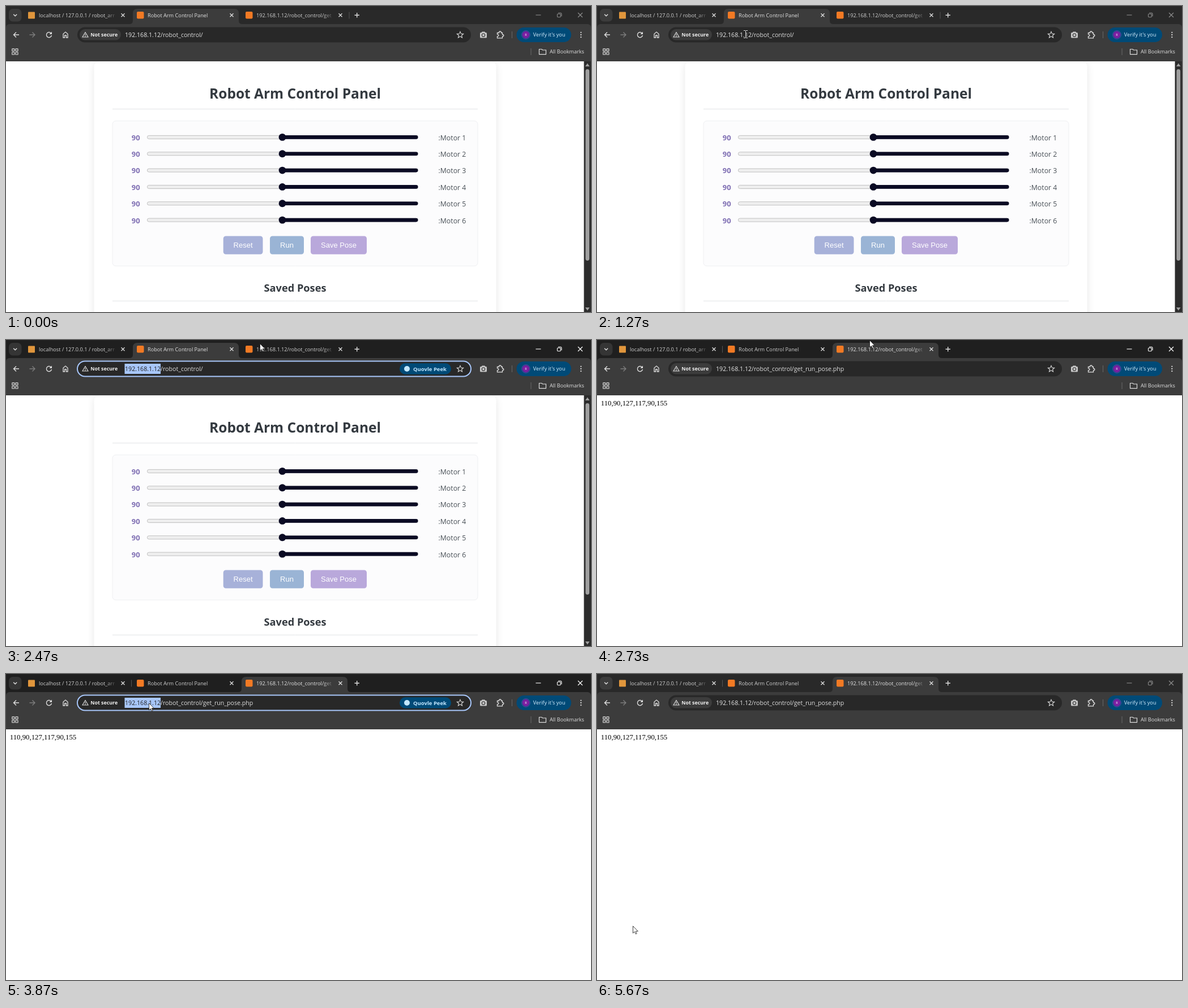
Write an HTML page with a canvas that moves like this. It is 1033 by 542 pixels and loops after 5.74 s.

```html
<!DOCTYPE html>
<html lang="en">
<head>
<meta charset="utf-8">
<title>Robot Arm Control Panel</title>
<style>
html, body { margin: 0; width: 100%; height: 100%; overflow: hidden; background: #fff; }
canvas { display: block; width: 1033px; height: 542px; }
</style>
</head>
<body>
<canvas id="stage"></canvas>
<script>
const W = 1033, H = 542, LOOP = 5740, STEP = 200 / 3;
const canvas = document.getElementById('stage');
const ctx = canvas.getContext('2d');
const dpr = window.devicePixelRatio || 1;
canvas.width = W * dpr;
canvas.height = H * dpr;

const SANS = '"Open Sans", "Noto Sans", sans-serif';
const ARIAL = '"Liberation Sans", Arial, sans-serif';
const SERIF = '"Liberation Serif", "Times New Roman", serif';
const HOST = '192.168.1.12';
const BAR = '#3c3c3c', ICON = '#dedede', BLUE = '#a8c7fa', NAVY = '#004a77';

// Pointer keys: time, x, y; equal neighbours hold the pose.
const PATH = [
  [70, 1020, 522], [270, 800, 300], [470, 530, 70], [600, 452, 12],
  [670, 440, 13], [730, 395, 32], [800, 332, 48], [1000, 285, 51],
  [1200, 263, 51], [1270, 262, 50], [2200, 262, 50], [2470, 448, 6],
  [2600, 462, 8], [2730, 481, 0], [2800, 470, 6], [3070, 240, 66],
  [3200, 216, 66], [3330, 271, 51], [3530, 253, 51], [3670, 253, 51],
  [3730, 252, 51], [4400, 252, 51], [4530, 190, 200], [4730, 25, 459],
  [5530, 25, 459], [5600, 32, 511], [5670, 63, 446], [LOOP, 63, 446]
];

function text(s, x, y, size, color, { weight = 400, family = SANS, align = 'left' } = {}) {
  ctx.font = `${weight} ${size}px ${family}`;
  ctx.textAlign = align;
  ctx.fillStyle = color;
  ctx.fillText(s, x, y);
}

function box(x, y, w, h, r, fill, stroke, width = 1) {
  ctx.beginPath();
  ctx.roundRect(x, y, w, h, r);
  paint(fill, stroke, width);
}

function circle(x, y, r, fill, stroke, width = 1) {
  ctx.beginPath();
  ctx.arc(x, y, r, 0, Math.PI * 2);
  paint(fill, stroke, width);
}

function paint(fill, stroke, width) {
  if (fill) { ctx.fillStyle = fill; ctx.fill(); }
  if (stroke) { ctx.strokeStyle = stroke; ctx.lineWidth = width; ctx.stroke(); }
}

// SVG path drawn relative to a point.
function shape(d, x, y, fill, stroke, width = 1.3) {
  const p = new Path2D(d);
  ctx.save();
  ctx.translate(x, y);
  if (fill) { ctx.fillStyle = fill; ctx.fill(p); }
  if (stroke) { ctx.strokeStyle = stroke; ctx.lineWidth = width; ctx.stroke(p); }
  ctx.restore();
}

const line = (d, x, y, color = ICON, width) => shape(d, x, y, null, color, width);
const cross = (x, y, r, color, width) =>
  line(`M${-r} ${-r}L${r} ${r}M${r} ${-r}L${-r} ${r}`, x, y, color, width);

function fadedText(s, x, y, right, color, under) {
  ctx.save();
  ctx.beginPath();
  ctx.rect(x - 1, 5, right - x + 1, 26);
  ctx.clip();
  text(s, x, y, 9.2, color);
  const g = ctx.createLinearGradient(right - 16, 0, right, 0);
  g.addColorStop(0, under + '00');
  g.addColorStop(1, under + 'c0');
  ctx.fillStyle = g;
  ctx.fillRect(right - 16, 9, 16, 16);
  ctx.restore();
}

function activeTab(x) {
  shape('M-6 27Q0 27 0 21V8Q0 0 8 0H179Q187 0 187 8V21Q187 27 193 27V28H-6Z', x, 5, BAR);
}

function tabStrip(s) {
  const strip = s.focused ? '#1f1f1f' : '#292929';
  ctx.fillStyle = strip;
  ctx.fillRect(0, 0, W, 40);
  box(5, 5, 22.5, 22.5, 7, s.focused ? '#353535' : BAR);
  line('M-3 -1.5L0 1.5L3 -1.5', 16.2, 16.3, ICON, 1.5);

  activeTab(s.second ? 416 : 224);
  if (s.hover > 0) {
    ctx.globalAlpha = s.hover;
    box(416, 5, 187, 23, 8, '#4a4a4a');
    ctx.globalAlpha = 1;
  }
  if (s.second) line('M0 0V12', 221.5, 10.5, '#555', 1);
  else if (!s.hover && !s.overTab) line('M0 0V12', 606, 10.5, '#555', 1);

  box(39, 10.5, 12, 12, 1, '#e0963c');
  box(231, 10, 12.5, 12.5, 2, '#f27a24');
  box(423, 10, 12.5, 12.5, 2, '#f27a24');
  const under = s.second ? BAR : s.hover > 0.5 ? '#4a4a4a' : strip;
  fadedText('localhost / 127.0.0.1 / robot_arm', 58, 20, 192, '#d0d0d0', strip);
  text('Robot Arm Control Panel', 250, 20, 9.2, s.second ? '#d0d0d0' : '#e3e3e3');
  fadedText(HOST + '/robot_control/get_', 442, 20, 575, s.second ? '#e3e3e3' : '#d0d0d0', under);
  for (const x of [206.5, 398.5, 590.5]) cross(x, 16.3, 3, ICON, 1.3);
  line('M-4.2 0H4.2M0 -4.2V4.2', 619.7, 16.3, ICON, 1.4);

  const ctl = s.focused ? '#fff' : '#8c8c8c';
  line('M-4.5 0H4.5', 940, 16, ctl, 1.1);
  box(973.5, 14, 5.8, 5.8, 1.2, null, ctl, 1.1);
  line('M-2 -4H2Q4 -4 4 -2V2', 977, 16.2, ctl, 1.1);
  cross(1014, 16, 4, ctl, 1.2);
}

function toolbar(s) {
  box(0, 32, W, 66, [6, 6, 0, 0], BAR);
  line('M5 0H-4M0 -4.5L-4.5 0L0 4.5', 18, 51, ICON, 1.4);
  line('M-5 0H4M0 -4.5L4.5 0L0 4.5', 46.5, 51, '#7d7d7d', 1.4);
  line('M3.2 -3.2A4.6 4.6 0 1 0 4.5 1', 76, 51, ICON, 1.4);
  shape('M5 -5.5V-1H.5Z', 76, 51, ICON);
  line('M-4 5V-1.5L0 -5L4 -1.5V5H1.4V1H-1.4V5Z', 105, 51, ICON, 1.3);

  if (s.selected) box(126, 37.5, 695, 27, 13.5, '#282828', BLUE, 2);
  else box(126, 37.5, 695, 27, 13.5, '#282828');
  if (!s.selected) box(130, 41, 73, 19.5, 9.75, BAR);
  line('M0 -4.5L5 4H-5ZM0 -1.5V1.4M0 2V3.2', 140, 51, ICON, 1.1);
  text('Not secure', 149.3, 54.3, 8.85, '#eee', { weight: 700 });

  const path = '/robot_control/' + (s.second ? 'get_run_pose.php' : '');
  text(HOST, 210, 54.7, 10.62, '#e8e8e8');
  const hostWidth = ctx.measureText(HOST).width;
  if (s.selected) {
    ctx.fillStyle = BLUE;
    ctx.fillRect(209.5, 42, hostWidth + 0.5, 18);
    text(HOST, 210, 54.7, 10.62, '#1f1f1f');
    box(695, 41.3, 91, 19.4, 9.7, NAVY);
    circle(708, 51, 5, '#c2e7ff');
    text('Quovle Peek', 719, 54.5, 9.5, '#c2e7ff', { weight: 700 });
  }
  text(path, 210 + hostWidth, 54.7, 10.62, '#dcdcdc');

  line('M0 -5.6L1.6 -1.9L5.6 -1.6L2.6 1L3.5 5L0 2.9L-3.5 5L-2.6 1L-5.6 -1.6L-1.6 -1.9Z', 802, 51, ICON, 1.1);
  box(837, 47, 12, 9.5, 1.5, '#c8c8c8');
  box(840, 45.4, 6, 3, 1, '#c8c8c8');
  circle(843, 51.6, 2.7, '#c8c8c8', '#444', 1.3);
  line('M-5 -3.5H-2Q-2 -6 0 -6T2 -3.5H4V-.5Q6.3 -.5 6.3 1.2T4 3V5.8H-5V2.8Q-2.6 2.8 -2.6 1T-5 -.8Z', 872.5, 51, ICON, 1.3);
  line('M0 -6V6', 893.5, 51, '#686868', 1);
  box(901.5, 38, 96.5, 26, 13, NAVY);
  circle(918, 51, 7.3, null, '#5a49a8', 1);
  circle(918, 51, 6.2, '#7b1fa2');
  text('R', 918, 53, 5.5, '#fff', { align: 'center' });
  text("Verify it's you", 930.8, 54.3, 9.2, '#d8efff');
  for (const y of [46.8, 51, 55.2]) circle(1015.3, y, 1.15, ICON);

  for (const x of [10.8, 17]) for (const y of [75.8, 82]) box(x, y, 4, 4, 0.3, null, ICON, 1.2);
  line('M0 -6V6', 927, 81, '#686868', 1);
  line('M-6 -4.5H-1.5L0 -3H6V4.7H-6Z', 947.5, 81, ICON, 1.2);
  text('All Bookmarks', 960, 84.2, 9.15, '#e0e0e0');
}

function slider(i) {
  const y = 232.4 + i * 29.34;
  text('90', 221.8, y + 5.4, 12.9, '#7f6fb3', { weight: 700 });
  box(249.4, y - 3, 477.6, 6, 3, '#efefef', '#bcbcbc', 0.9);
  box(488, y - 3.3, 239.5, 6.6, 3.3, '#0a0a23');
  circle(488, y, 6.4, '#0a0a23');
  text(':Motor ' + (i + 1), 812.3, y + 5.4, 12.3, '#495057', { align: 'right' });
}

function button(label, x, w, color) {
  box(x, 407.5, w, 32.2, 4.5, color);
  text(label, x + w / 2, 428.1, 13, '#fff', { family: ARIAL, align: 'center' });
}

function panelPage() {
  ctx.save();
  ctx.beginPath();
  ctx.rect(0, 98, W, H - 98);
  ctx.clip();
  ctx.shadowColor = 'rgba(0,0,0,.1)';
  ctx.shadowBlur = 14 * dpr;
  ctx.shadowOffsetY = 3 * dpr;
  box(155.5, 98, 710, 520, 9, '#fff');
  ctx.restore();

  text('Robot Arm Control Panel', 510.5, 164, 24.5, '#343a40', { weight: 700, align: 'center' });
  line('M188 182.5H833M188 522.5H833', 0, 0, '#e2e4e6', 1);
  box(188, 203.5, 645, 257, 6, '#fcfcfd', '#eff0f2', 1);
  for (let i = 0; i < 6; i++) slider(i);
  button('Reset', 383.7, 69.8, '#a7b1d9');
  button('Run', 466, 60, '#9ab4d5');
  button('Save Pose', 538, 99, '#b9a8db');
  text('Saved Poses', 510.5, 505.7, 18.2, '#343a40', { weight: 700, align: 'center' });

  ctx.fillStyle = '#2c2c2c';
  ctx.fillRect(1020.5, 98, 12.5, H - 98);
  box(1023.3, 112, 6.8, 339, 3.4, '#9f9f9f');
  shape('M-3.8 2.5H3.8L0 -3Z', 1026.7, 104.5, '#9f9f9f');
  shape('M-3.8 -2.5H3.8L0 3Z', 1026.7, 536.5, '#9f9f9f');
}

function pointer(t) {
  if (t < PATH[0][0]) return null;
  const i = PATH.findIndex(k => k[0] > t);
  const [t0, x0, y0] = PATH[i - 1], [t1, x1, y1] = PATH[i];
  const u = (t - t0) / (t1 - t0);
  return { x: x0 + (x1 - x0) * u, y: y0 + (y1 - y0) * u };
}

function drawPointer(p, beam) {
  if (beam) {
    const d = 'M-3.5 -6.5H-1Q0 -6.5 0 -5.5V5.5Q0 6.5 -1 6.5H-3.5M3.5 -6.5H1Q0 -6.5 0 -5.5M3.5 6.5H1Q0 6.5 0 5.5';
    line(d, p.x + 0.5, p.y, '#111', 2.2);
    line(d, p.x + 0.5, p.y, '#f4f4f4', 1);
  } else {
    shape('M.5 .5V13L3.4 10.4L5.3 14.6L7.2 13.8L5.4 9.7H9.4Z', p.x, p.y, '#fff', '#111', 0.8);
  }
}

function stateAt(t) {
  return {
    second: t >= 2600,
    focused: t >= 1470 && t < 5330,
    selected: (t >= 1530 && t < 2600) || (t >= 3800 && t < 5330),
    hover: t >= 670 && t < 1000 ? Math.min(1, (1000 - t) / 200) : 0,
    overTab: t >= 2400 && t < 2600,
    beam: (t >= 800 && t < 1530) || (t >= 3270 && t < 3730)
  };
}

function draw(now) {
  const step = Math.floor((now % LOOP + 5) / STEP);
  const t = Math.min(LOOP - 1, Math.round(step * STEP / 10) * 10);
  const s = stateAt(t);
  ctx.setTransform(dpr, 0, 0, dpr, 0, 0);
  ctx.fillStyle = '#fff';
  ctx.fillRect(0, 0, W, H);
  tabStrip(s);
  toolbar(s);
  if (s.second) text('110,90,127,117,90,155', 6.8, 115.7, 12.8, '#000', { family: SERIF });
  else panelPage();
  const p = pointer(t);
  if (p) drawPointer(p, s.beam);
}

const start = performance.now();
function frame() {
  draw(performance.now() - start);
  requestAnimationFrame(frame);
}
frame();
</script>
</body>
</html>
```
